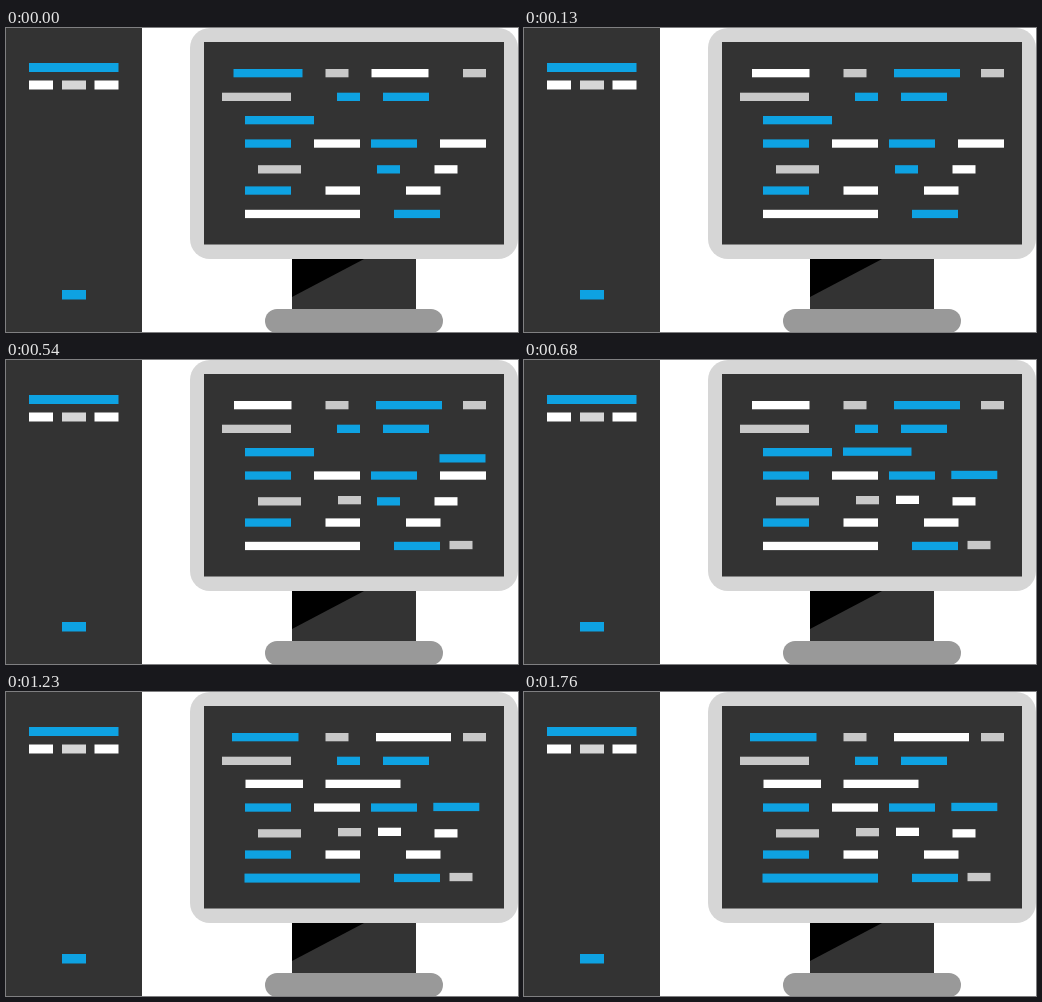
Recreate the animation shown at these times as an HTML page. Size 512 by 304 pixels, loop 2.12 s.

```html
<!DOCTYPE html>
<html lang="en">
<head>
<meta charset="utf-8">
<title>Code on a monitor</title>
<style>
  html, body { margin: 0; width: 100%; height: 100%; overflow: hidden; background: #fff; }
  svg { display: block; width: 512px; height: 304px; }
</style>
</head>
<body>
<svg viewBox="0 0 512 304">
  <rect width="136" height="304" fill="#333"/>
  <g id="tower"></g>
  <rect x="286" y="226" width="124" height="60" fill="#333"/>
  <path d="M286 230H360L286 269Z" fill="#000"/>
  <rect x="259" y="281" width="178" height="24" rx="12" fill="#999"/>
  <rect x="184" y="0" width="328" height="231" rx="20" fill="#d6d6d6"/>
  <rect x="198" y="14" width="300" height="202.5" fill="#333"/>
  <g id="screen"></g>
</svg>
<script>
const BLUE = '#0ea2e2', WHITE = '#fff', GREY = '#c8c8c8', LIGHT = '#d6d6d6';
const STARTS = [0, 130, 340, 680, 1230];
const LOOP = 2120;

const TOWER = [
  [23, 35, 89.5, BLUE, 9],
  [23, 52.5, 24, WHITE, 9], [56, 52.5, 24, LIGHT, 9], [88.5, 52.5, 24, WHITE, 9],
  [56, 262, 24, BLUE, 9.5],
];

// x, y, width, colour, height, first step, last step
const H = 8.3;
const LINES = [
  [227.5, 41, 69, BLUE, H, 0, 0],
  [228, 41, 57.5, WHITE, H, 1, 3],
  [226, 41, 66.5, BLUE, H, 4, 4],
  [319.5, 41, 23, GREY, H],
  [365.5, 41, 57, WHITE, H, 0, 0],
  [370, 41, 66, BLUE, H, 1, 3],
  [370, 41, 75, WHITE, H, 4, 4],
  [457, 41, 23, GREY, H],

  [216, 64.7, 69, GREY, H], [331, 64.7, 23, BLUE, H], [377, 64.7, 46, BLUE, H],

  [239, 88, 69, BLUE, H, 0, 3],
  [239.5, 87.7, 57.5, WHITE, H, 4, 4],
  [433.5, 94.2, 46, BLUE, H, 2, 2],
  [319, 87.5, 68.5, BLUE, H, 3, 3],
  [319.5, 87.7, 75, WHITE, H, 4, 4],

  [239, 111.4, 46, BLUE, H], [308, 111.4, 46, WHITE, H], [365, 111.4, 46, BLUE, H],
  [434, 111.4, 46, WHITE, H, 0, 2],
  [427.3, 110.8, 46, BLUE, H, 3, 4],

  [252, 137.2, 43, GREY, H],
  [332, 136, 23, GREY, H, 2, 4],
  [371, 137.2, 23, BLUE, H, 0, 2],
  [372, 135.7, 23, WHITE, H, 3, 4],
  [428.5, 137.2, 23, WHITE, H],

  [239, 158.4, 46, BLUE, H], [319.5, 158.4, 34.5, WHITE, H], [400, 158.4, 34.5, WHITE, H],

  [239, 181.8, 115, WHITE, H, 0, 3],
  [238.5, 181.6, 115.5, BLUE, 9, 4, 4],
  [388, 181.8, 46, BLUE, H],
  [443.5, 180.9, 23, GREY, H, 2, 4],
];

function addBar(parent, [x, y, width, fill, height, first = 0, last = 4]) {
  const el = document.createElementNS('http://www.w3.org/2000/svg', 'rect');
  for (const [key, value] of Object.entries({ x, y, width, height, fill })) el.setAttribute(key, value);
  parent.append(el);
  return { el, first, last };
}

const tower = document.getElementById('tower');
const screen_ = document.getElementById('screen');
TOWER.forEach(bar => addBar(tower, bar));
const bars = LINES.map(bar => addBar(screen_, bar));

function draw(time) {
  const t = time % LOOP;
  const step = STARTS.filter(start => start <= t).length - 1;
  for (const { el, first, last } of bars) {
    el.setAttribute('visibility', step >= first && step <= last ? 'visible' : 'hidden');
  }
}

const begin = performance.now();
function tick() {
  draw(performance.now() - begin);
  requestAnimationFrame(tick);
}
tick();
</script>
</body>
</html>
```
